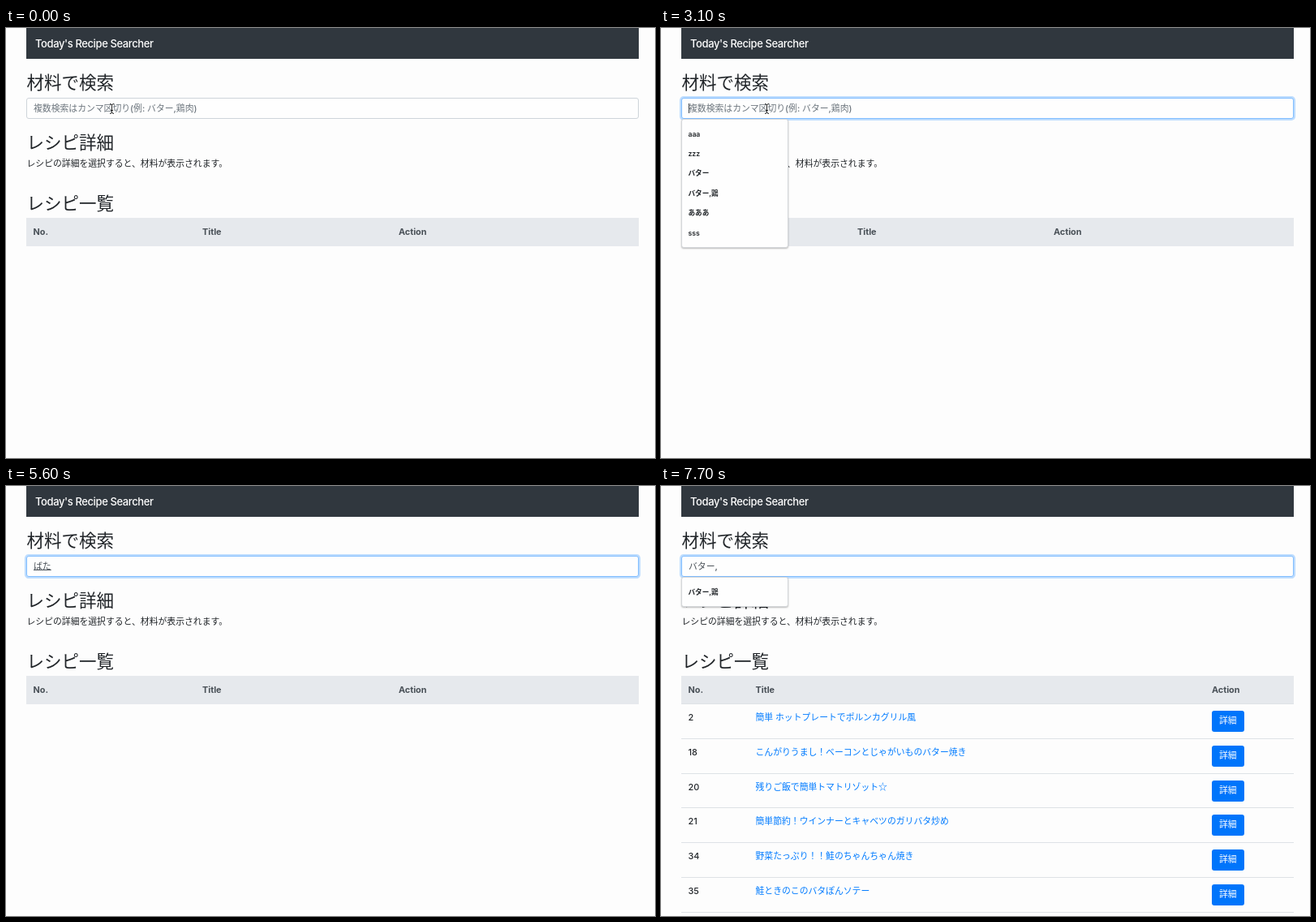
These frames come from a looping animation (800 by 530 pixels, 8000 ms). An HTML page:

```html
<!DOCTYPE html>
<html lang="ja">
<head>
<meta charset="utf-8">
<style>
html, body { margin: 0; width: 100%; height: 100%; overflow: hidden; background: #fdfdfd; }
#stage { position: relative; width: 800px; height: 530px; overflow: hidden; color: #212529;
  font: 500 10.83px/20px Inter, "Noto Sans CJK JP", "Noto Sans CJK", sans-serif; }
#stage div { position: absolute; white-space: pre; box-sizing: border-box; }
.nav { left: 25px; top: 0; width: 755px; height: 38px; background: #30373e; }
.brand { color: #fff; font-size: 13px; letter-spacing: -.03em; }
.h2 { font-size: 21.5px; font-weight: 400; }
.head { left: 25px; top: 234px; width: 755px; height: 34.5px; background: #e6e9ed; }
.th { font-weight: 700; color: #495057; }
.line { left: 25px; width: 755px; height: 1px; background: #dee2e6; }
.link { color: #007bff; }
.btn { width: 39.5px; height: 26px; border-radius: 3px; background: #0075fb; color: #fff;
  line-height: 26px; text-align: center; }
.note { font-family: "DejaVu Sans", sans-serif; line-height: 0; }
.star { font-family: "Noto Sans CJK JP", "Noto Sans CJK", sans-serif; line-height: 0; }
#field { left: 25px; top: 86px; width: 755px; height: 25.5px; border: 1px solid; border-radius: 3px;
  background: #fefefe; color: #495057; }
.ime { text-decoration: underline 1px; text-underline-offset: 0; text-decoration-skip-ink: none; }
.sel { background: #b3d7fe; }
.hint { color: #6c757d; }
.caret { display: inline-block; width: 1px; height: 12px; margin-right: -1px;
  vertical-align: -2px; background: #343a40; }
.menu { left: 24.5px; top: 112px; width: 132px; background: #fefefe; border: 1px solid #d4d7da;
  border-radius: 3px; box-shadow: 0 1px 2px #0004; }
.item { font-size: 8.6px; font-weight: 600; }
svg { position: absolute; left: 126px; top: 93px; }
</style>
</head>
<body>
<div id="stage">
  <div id="page"></div>
  <div id="field"></div>
  <div id="over"></div>
</div>
<script>
const LOOP = 8000;
const HINT = '複数検索はカンマ区切り(例: バター,鶏肉)';

// [time, text, style]
const typing = [
  [100, '', ''], [3500, 'b', 'ime'], [3700, 'ば', 'ime'], [4800, 'ばt', 'ime'], [5000, 'ばた', 'ime'],
  [5700, 'ばたー', 'ime'], [6000, 'バター', 'ime sel'], [6200, 'バター', ''], [7200, 'バター,', '']
];

const none = { cols: [242, 484], rows: [] };
// [time, result list]
const results = [
  [0, none],
  [3500, { cols: [138, 647], rows: [
    [946, 'ピリ辛☆うまい！節約豆乳ごま坦々鍋'],
    [950, 'ピリ辛☆うまい！節約豆乳ごま坦々鍋'],
    [1667, '子供の大好物★豚玉焼きビーフン〜♪'],
    [1806, 'メバルで美味しいアクアパッツァ♪']] }],
  [3800, { cols: [116.5, 679], rows: [
    [8, '子どもにも好評♪豚肉と玉ねぎのガリマヨポン♪'],
    [24, 'じゃがいも・たまねぎ・ウインナーのマヨ炒め'],
    [41, '塩サバのさっぱり☆ぽん酢焼き'],
    [42, '和食の定番のさばの味噌煮'],
    [51, '刺身の切り落としでOK☆絶品”漬け丼”'],
    [57, '炊飯器に鯛を丸ごとはダメ！美味しい鯛飯を炊くコツ！']] }],
  [4900, none],
  [6000, { cols: [116.5, 679], rows: [
    [2, '簡単 ホットプレートでポルンカグリル風'],
    [18, 'こんがりうまし！ベーコンとじゃがいものバター焼き'],
    [20, '残りご飯で簡単トマトリゾット☆'],
    [21, '簡単節約！ウインナーとキャベツのガリバタ炒め'],
    [34, '野菜たっぷり！！鮭のちゃんちゃん焼き'],
    [35, '鮭ときのこのバタぽんソテー']] }]
];

// [time, suggestions]
const menus = [
  [0, []], [300, ['aaa', 'zzz', 'バター', 'バター,鶏', 'あああ', 'sss']],
  [3500, []], [7200, ['バター,鶏']]
];

const current = (list, t) => list.findLast(e => e[0] <= t);
const box = (cls, style, text = '') => `<div class="${cls}" style="${style}">${text}</div>`;
const text = (x, y, s, cls = '') => box(cls, `left:${x}px;top:${y - 10}px`, s);
const symbols = s => s.replace(/♪/g, '<span class="note">♪</span>')
  .replace(/[☆★]/g, '<span class="star">$&</span>');

function page(t) {
  const { cols: [title, action], rows } = current(results, t)[1];
  let html = box('nav', '') + text(36, 19, "Today's Recipe Searcher", 'brand')
    + text(25.5, 67, '材料で検索', 'h2') + text(25.5, 140.5, 'レシピ詳細', 'h2')
    + text(25.5, 168, 'レシピの詳細を選択すると、材料が表示されます。')
    + text(25.5, 215.5, 'レシピ一覧', 'h2') + box('head', '')
    + text(33.5, 252, 'No.', 'th') + text(title, 252, 'Title', 'th') + text(action, 252, 'Action', 'th');
  rows.forEach(([no, name], i) => {
    const y = 42.8 * i;
    html += box('line', `top:${Math.round(268 + y)}px`)
      + text(33.5, 286 + y, no) + text(title, 286 + y, symbols(name), 'link')
      + box('btn', `left:${action}px;top:${277 + y}px`, '詳細');
  });
  if (rows.length > 5) html += box('line', 'top:525px');
  return html;
}

function field(t) {
  const [start, value, style] = current(typing, t) || [Infinity, '', ''];
  const on = t >= start && (t - start) % 1000 < 500 && !style.includes('sel');
  const caret = on ? '<span class="caret"></span>' : '';
  const inner = value ? `<span class="${style}">${value}</span>${caret}`
    : `${caret}<span class="hint">${HINT}</span>`;
  return box('', 'left:8px;top:3px', inner);
}

function over(t) {
  const items = current(menus, t)[1];
  let html = '';
  if (items.length) {
    html = box('menu', `height:${12.5 + 24.4 * items.length}px`)
      + items.map((s, i) => text(33.5, 130.5 + 24.4 * i, s, 'item')).join('');
  }
  if (t < 3500) {
    html += '<svg width="9" height="13" fill="none" stroke="#222">'
      + '<path d="M2 .5Q4.5 .5 4.5 2.5V10.5Q4.5 12.5 2 12.5M7 .5Q4.5 .5 4.5 2.5M4.5 10.5Q4.5 12.5 7 12.5M3 8.5H6"/></svg>';
  }
  return html;
}

const shown = {};
function show(id, html) {
  if (shown[id] === html) return;
  document.getElementById(id).innerHTML = shown[id] = html;
}

// Border and ring of the input ease in when it gains focus.
const input = document.getElementById('field');
function focusRing(t) {
  const p = Math.min(1, Math.max(0, (t - 100) / 150));
  const k = p * p * (3 - 2 * p);
  const mix = (a, b) => a + (b - a) * k;
  input.style.borderColor = `rgb(${mix(206, 128)},${mix(212, 189)},${mix(218, 255)})`;
  input.style.boxShadow = `0 0 0 ${2.1 * k}px rgba(0,123,255,${0.25 * k})`;
}

const begin = performance.now();
function draw() {
  const t = (performance.now() - begin) % LOOP;
  focusRing(t);
  show('page', page(t));
  show('field', field(t));
  show('over', over(t));
  requestAnimationFrame(draw);
}
draw();
</script>
</body>
</html>
```
